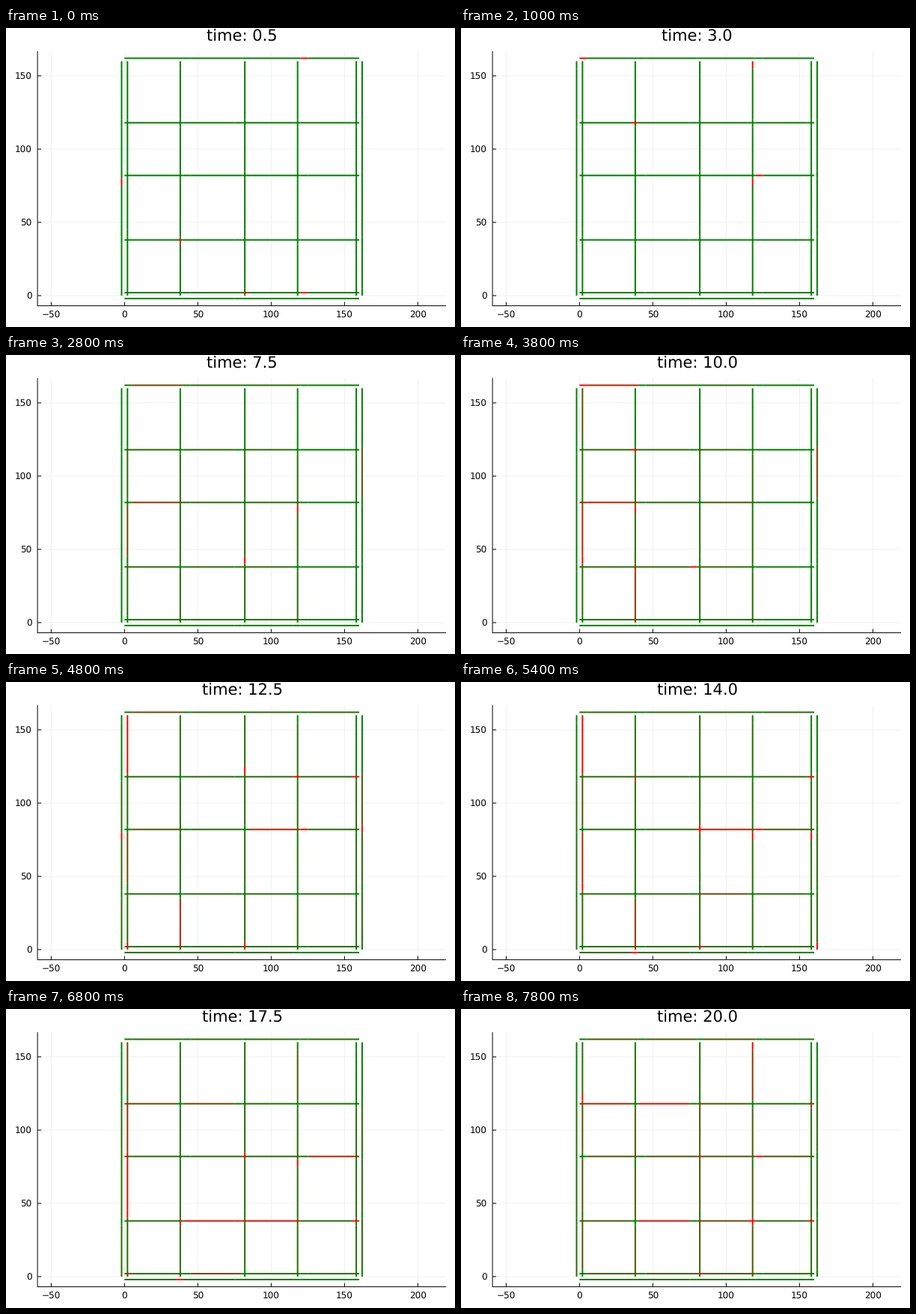
A matplotlib script for the animation above (8 s loop, 600 by 400 pixels).

```python
import math

import numpy as np
import matplotlib.pyplot as plt
from matplotlib.animation import FuncAnimation
from matplotlib.collections import LineCollection

plt.rcParams["text.hinting"] = "none"
plt.rcParams["text.hinting_factor"] = 1

W, H, DPI = 600, 400, 100
FRAMES, INTERVAL, STEP = 40, 200, 0.5
SCALE = 1.96
BLOCK, QUEUE, CAPACITY = 40, 5, 7
GREEN, RED = np.array([0, 128 / 255, 0]), np.array([1.0, 0, 0])

FORWARD = (-2, 38, 118, 158)
# crossings: later roads cover earlier ones
ROADS = [("y", c) for c in (2, 82, 162)]
ROADS += [("x", c) for c in (-2, 2, 38, 82, 118, 158, 162)]
ROADS += [("y", c) for c in (-2, 38, 118)]

# traffic jams: road, link, time of the peak, cars at the peak
JAMS = [
    ("x2", 1, 10, 5), ("x2", 1, 16, 7), ("x2", 2, 17.5, 4), ("x2", 3, 14, 7),
    ("x38", 0, 12, 5), ("x118", 3, 20, 4), ("x162", 2, 10, 4),
    ("y2", 1, 17, 3), ("y38", 1, 18.5, 7), ("y38", 2, 17, 6),
    ("y82", 0, 9, 5), ("y82", 2, 13, 5), ("y82", 3, 17, 5),
    ("y118", 0, 20, 5), ("y118", 1, 20.5, 6), ("y162", 0, 10, 5),
]
JAM_WIDTH = 2.5


def px(x):
    return 158.4 + SCALE * x


def py(y):
    return 358 - SCALE * y


def pt(pixels):
    return pixels * 72 / DPI


def piece(axis, c, a, b):
    if axis == "x":
        return [(px(c), py(a)), (px(c), py(b))]
    return [(px(a), py(c)), (px(b), py(c))]


def cars(axis, c, link, t):
    """Slow growth everywhere, with jams that build up and clear."""
    rim = c < 0 or (axis == "x" and c > 150)
    n = (0.8 if rim else 1.6) * t / 20
    if link == 3:
        n /= 2
    for road, where, peak, most in JAMS:
        if (road, where) == (f"{axis}{c}", link):
            n = max(n, most * math.exp(-((t - peak) / JAM_WIDTH) ** 2 / 2))
    return int(n + 0.5)


def mix(f):
    return GREEN + (RED - GREEN) * f


segments = []
for axis, c in ROADS:
    for i in range(4):
        a, b = BLOCK * i, BLOCK * (i + 1)
        cut = b - QUEUE if c in FORWARD else a + QUEUE
        parts = [piece(axis, c, a, cut), piece(axis, c, cut, b)]
        segments += parts if c in FORWARD else parts[::-1]

fig = plt.figure(figsize=(W / DPI, H / DPI), dpi=DPI, facecolor="white")
ax = fig.add_axes([0, 0, 1, 1])
ax.set_xlim(0, W)
ax.set_ylim(H, 0)
ax.axis("off")


def rule(x0, y0, x1, y1, color="black"):
    ax.plot([x0, x1], [y0, y1], color=color, lw=pt(1), snap=False,
            solid_capstyle="butt", zorder=1)


def label(x, y, s, ha, size=11.9):
    return ax.text(x, y, s, ha=ha, va="baseline", fontsize=pt(size),
                   family="DejaVu Sans", color="black")


LEFT, RIGHT, TOP, BOTTOM = 42.1, 588, 31, 371.6
xticks, yticks = range(-50, 201, 50), range(0, 151, 50)
for v in xticks:
    rule(px(v), TOP, px(v), BOTTOM, "#f0f0f0")
for v in yticks:
    rule(LEFT, py(v), RIGHT, py(v), "#f0f0f0")
for v in xticks:
    rule(px(v), BOTTOM, px(v), BOTTOM - 5)
    label(px(v), 387.5, str(v).replace("-", "\u2212"), "center")
for v in yticks:
    rule(LEFT, py(v), LEFT + 5, py(v))
    label(34.5, py(v) + 4.4, str(v), "right")
rule(LEFT, TOP, LEFT, BOTTOM + 0.5)
rule(LEFT, BOTTOM, RIGHT, BOTTOM)

title = label(315.5, 18, "", "center", 20.8)
streets = LineCollection(segments, linewidths=pt(2), capstyle="butt", zorder=3)
streets.set_snap(False)
ax.add_collection(streets, autolim=False)


def draw(k):
    t = STEP * (k + 1)
    rng = np.random.default_rng(k)
    colors = []
    for axis, c in ROADS:
        for i in range(4):
            n = cars(axis, c, i, t)
            waiting = rng.random() < 0.05 + 0.09 * n
            colors += [mix(n / CAPACITY), mix(float(waiting))]
    streets.set_color(colors)
    title.set_text(f"time: {t:.1f}")
    return streets, title


anim = FuncAnimation(fig, draw, frames=FRAMES, interval=INTERVAL,
                     repeat=True, repeat_delay=0)
plt.show()
```
